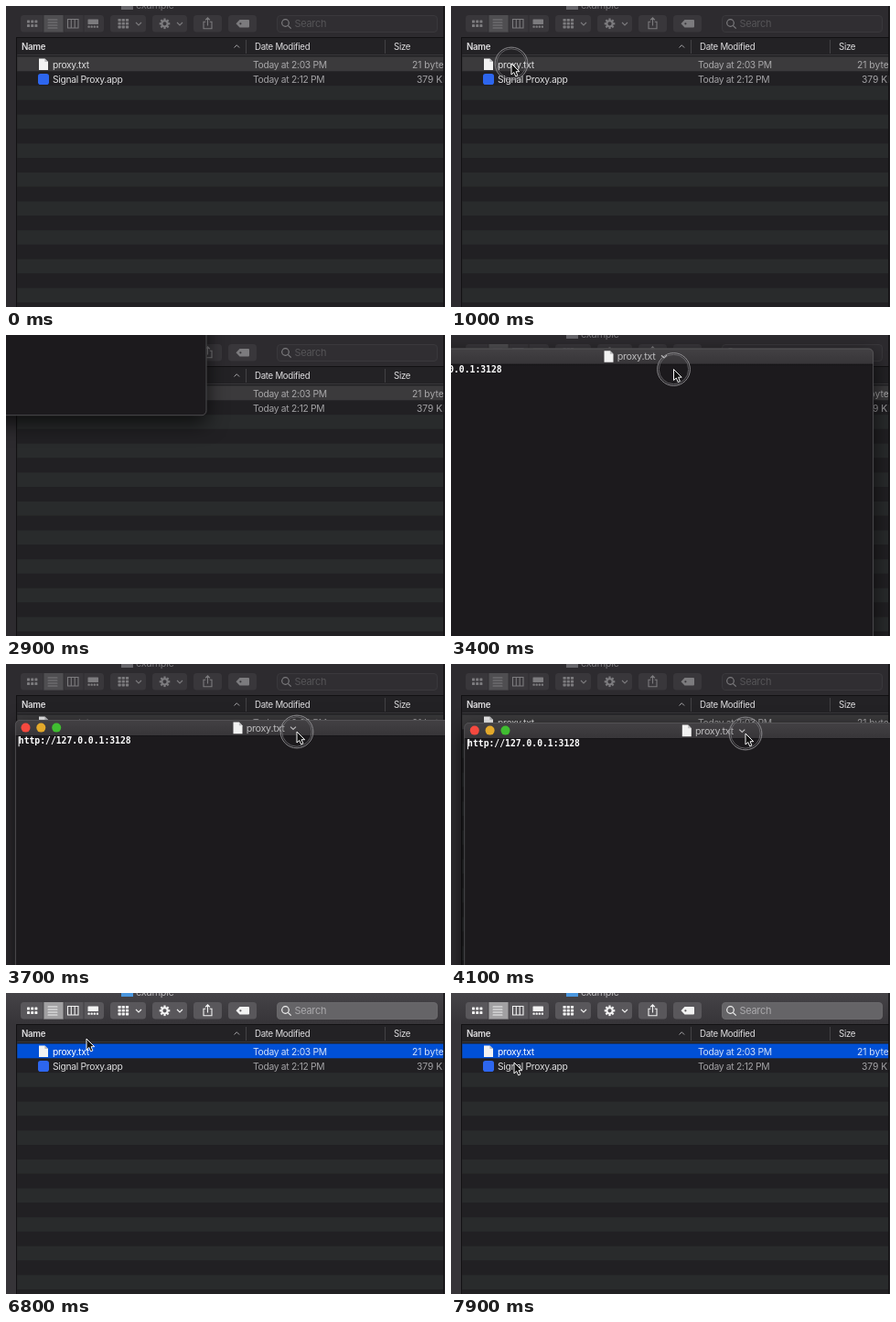
Animation, 480 px wide and 329 px high, one loop 8000 ms. Source, as an HTML page:

```html
<!DOCTYPE html>
<html lang="en">
<head>
<meta charset="utf-8">
<title>Opening a text file</title>
<style>
  html, body { margin: 0; width: 100%; height: 100%; overflow: hidden; background: #1f1e20; }
  svg { display: block; width: 480px; height: 329px; }
  text { font-family: Inter, Roboto, sans-serif; letter-spacing: -0.3px; font-size: 10.3px; white-space: pre; }
  #stage {
    --bar: #2d2b2f; --barTop: #2d2b2f; --btn: #39373b; --on: #4f4e51; --glyph: #7c7b7e; --field: #302e32;
    --edge: #3c3a3e; --hint: #555457; --title: #77767a; --folder: #66656a;
    --pick: #3b3a3c; --pickText: #dededf; --pickInfo: #a8a7a9;
  }
  #stage.active {
    --bar: #363438; --barTop: #454347; --btn: #59575b; --on: #a1a0a2; --glyph: #f2f2f2; --field: #656467;
    --edge: #6c6b6e; --hint: #a9a8ab; --title: #b4b3b6; --folder: #4a96de;
    --pick: #0050d6; --pickText: #ffffff; --pickInfo: #d3e0f8;
  }
  .bar { fill: var(--bar); }
  .btn { fill: var(--btn); }
  .on { fill: var(--on); }
  .glyph { fill: var(--glyph); }
  .line { fill: none; stroke: var(--glyph); stroke-width: 1.1; }
  .head { fill: #dfdee0; font-size: 9.7px; }
  .info { fill: #a3a2a5; }
  .size { letter-spacing: 0; }
  #doc { filter: drop-shadow(0 8px 11px rgba(0, 0, 0, .7)); }
  #doc .mono { font: bold 9.73px "DejaVu Sans Mono", monospace; letter-spacing: 0; fill: #fff; }
</style>
</head>
<body>
<svg id="stage" viewBox="0 0 480 329">
  <defs>
    <linearGradient id="barFill" x2="0" y2="1">
      <stop offset="0" stop-color="var(--barTop)"/><stop offset="1" stop-color="var(--bar)"/>
    </linearGradient>
    <linearGradient id="titlebar" x2="0" y2="1">
      <stop offset="0" stop-color="#434144"/><stop offset="1" stop-color="#373538"/>
    </linearGradient>
    <clipPath id="listClip"><rect x="12.3" y="35" width="466.2" height="294"/></clipPath>
    <g id="page">
      <path d="M0 0H6.4L10 3.6V12.6H0Z" fill="#f2f2f2"/>
      <path d="M6.4 0V3.6H10Z" fill="#bdbdbf"/>
    </g>
  </defs>

  <rect class="bar" width="480" height="329"/>
  <g id="toolbar">
    <rect width="479" height="34.5" fill="url(#barFill)"/>
    <path d="M126 -5h5l1.5 2h6.5v7h-13z" fill="var(--folder)"/>
    <text x="142" y="2.8" style="font-size:11px" fill="var(--title)">example</text>
  </g>

  <g clip-path="url(#listClip)">
    <rect x="12" y="35" width="468" height="294" fill="#212023"/>
    <g id="rows"></g>
    <rect x="12" y="55.5" width="468" height="15.8" fill="var(--pick)"/>
    <g id="header"></g>
    <use href="#page" x="36" y="57.5"/>
    <text x="51" y="67.8" fill="var(--pickText)">proxy.txt</text>
    <text x="270" y="67.8" fill="var(--pickInfo)">Today at 2:03 PM</text>
    <text x="444" y="67.8" class="size" fill="var(--pickInfo)">21 bytes</text>
    <rect x="35" y="74" width="12" height="12" rx="2.8" fill="#2d66ee"/>
    <text x="51" y="83.6" fill="#dededf">Signal Proxy.app</text>
    <text x="270" y="83.6" class="info">Today at 2:12 PM</text>
    <text x="449" y="83.6" class="info size">379 KB</text>
  </g>
  <path d="M11.5 35V329M11 34.5H479" stroke="#121113" fill="none"/>
  <path d="M478.9 0V329" stroke="#0d0c0e" stroke-width="1.2"/>

  <g id="doc">
    <rect width="533" height="400" rx="5" fill="#1c1a1d"/>
    <path d="M0 17.5V5a5 5 0 0 1 5-5H528a5 5 0 0 1 5 5V17.5Z" fill="url(#titlebar)"/>
    <path d="M0 17.5H533" stroke="#111012" stroke-width=".8"/>
    <rect x=".4" y=".4" width="532.2" height="399.2" rx="5" fill="none" stroke="#5a595b" stroke-width=".8"/>
    <circle cx="11.5" cy="8.6" r="5" fill="#f5493f"/>
    <circle cx="28.3" cy="8.6" r="5" fill="#e3a92b"/>
    <circle cx="45.2" cy="8.6" r="5" fill="#40bd31"/>
    <use href="#page" x="238.5" y="2.6"/>
    <text x="252.7" y="12.8" style="font-size:10.8px" fill="#bcbbbd">proxy.txt</text>
    <path d="M301 7.6l3 2.8 3-2.8" fill="none" stroke="#bcbbbd" stroke-width="1.2"/>
    <text x="3.8" y="26.3" class="mono">http://127.0.0.1:3128</text>
    <rect id="caret" x="3.6" y="18.2" width="1" height="11" fill="#fff"/>
  </g>

  <g id="pointer">
    <g id="ring" fill="none">
      <circle r="17.9" stroke="#959497" stroke-width=".9"/>
      <circle r="16.2" stroke="#6f6e71" stroke-width=".8"/>
    </g>
    <path d="M0 0V12L2.8 9.5L4.7 13.9L6.9 13L5.1 8.7H8.7Z" fill="#111" stroke="#fff" stroke-width=".95"/>
  </g>
</svg>
<script>
const LOOP = 8000, STEP = 100;
const $ = id => document.getElementById(id);
const add = (id, markup) => $(id).insertAdjacentHTML('beforeend', markup);

// Toolbar
const box = (x, w, cls = 'btn', r = 3.5) =>
  `<rect class="${cls}" x="${x}" y="10" width="${w}" height="18.5" rx="${r}"/>`;
const dot = (x, y, w, h) => `<rect class="glyph" x="${x}" y="${y}" width="${w}" height="${h}" rx=".6"/>`;
const stroke = d => `<path class="line" d="${d}"/>`;
const grid = (x, y, cols, rows, w, h, dx, dy) => {
  let out = '';
  for (let r = 0; r < rows; r++)
    for (let c = 0; c < cols; c++) out += dot(x + c * dx, y + r * dy, w, h);
  return out;
};
const down = x => stroke(`M${x - 3} 18l3 3 3-3`);

let teeth = '';
for (let a = 0; a < 360; a += 45)
  teeth += `<rect class="glyph" x="-1.1" y="-5.8" width="2.2" height="3" transform="rotate(${a})"/>`;

add('toolbar', [
  box(16, 91), box(41, 22, 'on', 0),
  `<path d="M41 10V28.5M63 10V28.5M85 10V28.5" stroke="var(--bar)" stroke-width=".7"/>`,
  grid(23, 15.5, 3, 2, 3, 3, 4.2, 4.6),
  grid(45.5, 14.5, 1, 4, 11, 1, 0, 3),
  stroke('M67.5 14.5h11.5v9.5h-11.5zM71.3 14.5v9.5M75.2 14.5v9.5'),
  dot(89.5, 14.5, 11.5, 5.6), grid(89.5, 21.6, 4, 1, 2.2, 2.2, 3.1, 0),
  box(114, 39), grid(122.5, 14, 3, 3, 3.2, 2.8, 4.2, 3.8), down(145),
  box(160, 38),
  `<g transform="translate(173.5 19.3)">${teeth}<circle r="3.1" fill="none" stroke="var(--glyph)" stroke-width="2"/></g>`,
  down(190),
  box(205, 31), stroke('M218.3 17.3h-2.3v7.4h9v-7.4h-2.3M220.5 21.5v-8.5M218 15.3l2.5-2.5 2.5 2.5'),
  box(243, 31),
  '<path class="glyph" d="M251.5 19.3l4-4.3h9.5a1 1 0 0 1 1 1v6.6a1 1 0 0 1-1 1h-9.5z"/><circle cx="256.4" cy="19.3" r="1.1" fill="var(--btn)"/>',
  `<rect x="296.5" y="10.5" width="175" height="18" rx="3.5" fill="var(--field)" stroke="var(--edge)" stroke-width=".9"/>`,
  `<g fill="none" stroke="var(--glyph)" stroke-width="1.2"><circle cx="305.5" cy="18.5" r="3.8"/><path d="M308.3 21.3l3.4 3.4"/></g>`,
  `<text x="315.5" y="23.2" style="font-size:11px" fill="var(--hint)">Search</text>`
].join(''));

// File list
const PITCH = 15.8;
for (let i = 0; i < 18; i++)
  add('rows', `<rect x="12" y="${55.5 + i * PITCH}" width="468" height="${PITCH}" fill="${i % 2 ? '#212023' : '#292b2c'}"/>`);

add('header', `<rect x="12" y="35" width="468" height="18.5" fill="#232225"/>
  <path d="M12 53.5H480" stroke="#39383b"/>
  <path d="M262.5 37V52M414.5 37V52" stroke="#434245"/>
  <text class="head" x="17" y="47.8" font-weight="600">Name</text>
  <text class="head" x="272" y="47.8">Date Modified</text>
  <text class="head" x="424" y="47.8">Size</text>
  <path d="M249.5 45.5l2.8-2.8 2.8 2.8" fill="none" stroke="#a3a2a5"/>`);

// Motion: [time, x, y] points, eased between neighbours
const pointerPath = [
  [200, 176, 114], [600, 38, 74], [1000, 66, 63], [1700, 66, 63], [2100, 62, 57], [2400, 62, 57],
  [2900, -30, -290], [3400, 243.5, 37.5], [3700, 318, 74], [4000, 322, 76], [6300, 322, 76],
  [6800, 88, 50], [7200, 76, 62], [7600, 72, 85], [7900, 69, 76]
];
const docPath = [[2800, -333, -338], [3400, -71, 14.6], [3700, 10, 61], [4000, 14.3, 64]];
const clamp = v => Math.max(0, Math.min(1, v));
const within = (t, ...spans) => spans.some(([a, b]) => t >= a && t < b);
const smooth = k => k * k * (3 - 2 * k);

function at(path, t) {
  let i = path.findIndex(p => p[0] > t);
  if (i < 0) i = path.length;
  const a = path[Math.max(0, i - 1)], b = path[Math.min(i, path.length - 1)];
  const k = a === b ? 0 : smooth((t - a[0]) / (b[0] - a[0]));
  return [a[1] + (b[1] - a[1]) * k, a[2] + (b[2] - a[2]) * k];
}

const show = (id, on) => $(id).setAttribute('visibility', on ? 'visible' : 'hidden');
const place = (id, x, y, extra = '') => $(id).setAttribute('transform', `translate(${x} ${y})${extra}`);

function draw(t) {
  $('stage').classList.toggle('active', within(t, [1100, 1500], [5900, LOOP]));

  const grow = clamp((t - 1600) / 500), fade = clamp((6000 - t) / 300);
  const scale = 0.6 + 0.4 * smooth(grow);
  $('doc').style.display = within(t, [1700, 6000]) ? '' : 'none';
  $('doc').setAttribute('opacity', Math.min(grow, fade));
  place('doc', ...at(docPath, t), ` translate(266 200) scale(${scale}) translate(-266 -200)`);
  show('caret', within(t, [1700, 4700], [5000, 5600]));

  place('pointer', ...at(pointerPath, t));
  $('pointer').style.display = within(t, [200, 2400], [2900, LOOP]) ? '' : 'none';
  show('ring', within(t, [1000, 1200], [1300, 1400], [2900, 4600]));
}

const start = performance.now();
function tick() {
  const t = (performance.now() - start) % LOOP;
  draw(Math.floor(t / STEP) * STEP);
  requestAnimationFrame(tick);
}
draw(0);
requestAnimationFrame(tick);
</script>
</body>
</html>
```
